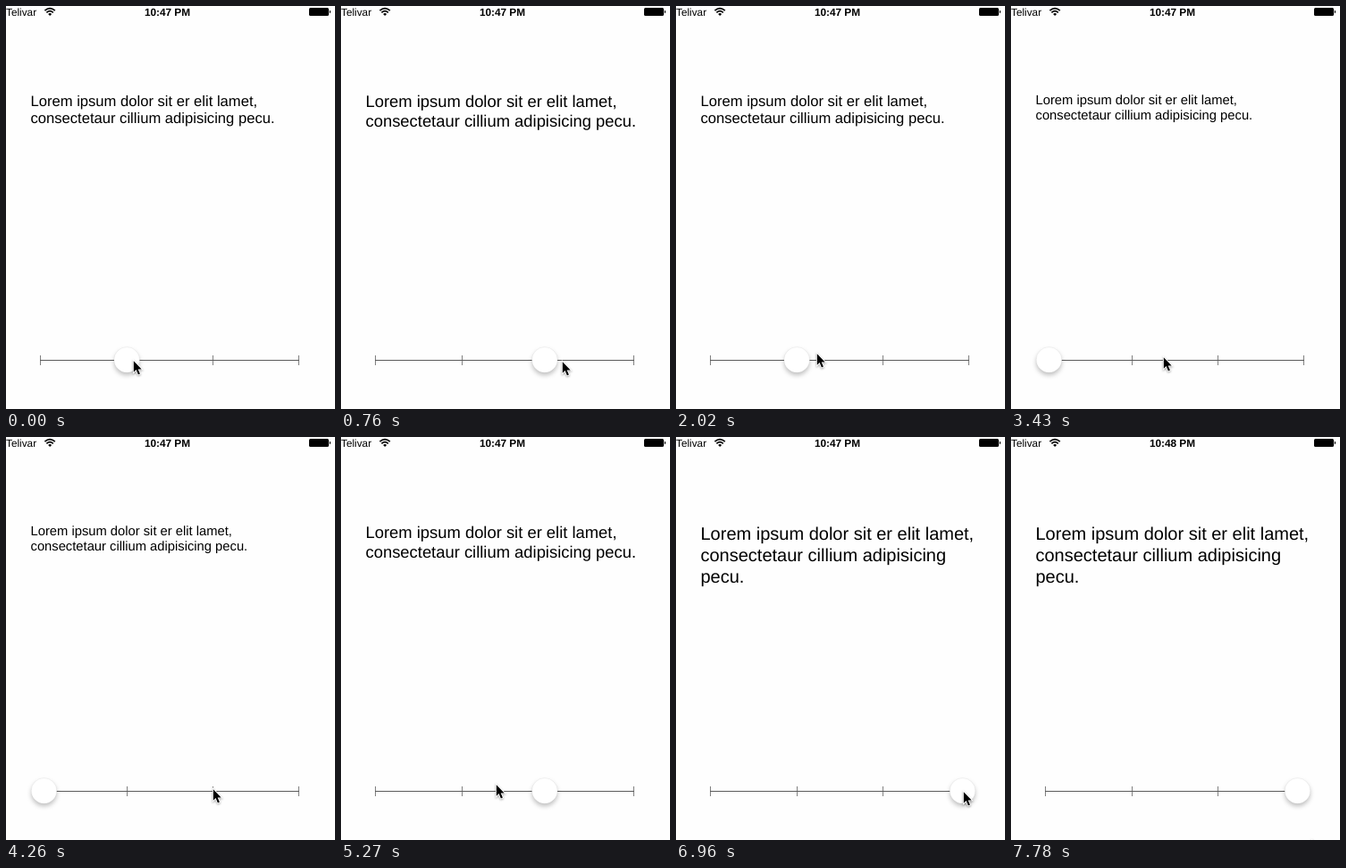
An HTML page for the animation above (8.27 s loop, 368x451 px).

```html
<!DOCTYPE html>
<html lang="en">
<head>
<meta charset="utf-8">
<title>Text size slider</title>
<style>
  html, body { margin: 0; width: 100%; height: 100%; overflow: hidden; background: #fefefe; }
  svg { display: block; width: 368px; height: 451px; }
  text { font-family: "Liberation Sans", Arial, sans-serif; text-rendering: geometricPrecision; }
  #thumb { filter: drop-shadow(0 3px 2.4px rgba(0, 0, 0, .24)); }
  #cursor { filter: drop-shadow(0 1px .8px rgba(0, 0, 0, .35)); }
</style>
</head>
<body>
<svg viewBox="0 0 368 451">
  <g font-size="11.8">
    <text x="0" y="10.6">Telivar</text>
    <text id="clock" x="180.5" y="10.6" text-anchor="middle" font-weight="bold">10:47 PM</text>
  </g>
  <g fill="none" stroke="#000" stroke-width="1.7">
    <path d="M43.4 5.2Q49 0 54.8 5.2M45.4 7.4Q49 4 52.8 7.4"/>
    <path d="M49.1 11L47.1 8.9Q49.1 7.3 51.1 8.9Z" fill="#000" stroke="none"/>
  </g>
  <rect x="339" y="2" width="22" height="9" rx="1.5"/>
  <path d="M361.8 4.5Q364.6 6.5 361.8 8.5Z"/>

  <g id="label"></g>

  <g fill="none">
    <path d="M38.5 391V402M135.5 391V402M231.5 391V402M327.5 391V402" stroke="#808080"/>
    <path d="M38 396.5H328" stroke="#5c5c5c"/>
  </g>
  <circle id="thumb" cy="396" r="14.3" fill="#fff" stroke="#000" stroke-opacity=".1" stroke-width=".5"/>
  <path id="cursor" d="M.8 1.2V13.8L3.6 11.1 5.9 16.4 7.9 15.5 5.7 10.4H9.7Z"
        stroke="#fff" stroke-width="1.8" paint-order="stroke"/>
</svg>
<script>
const LOOP = 8270;
const $ = id => document.getElementById(id);

const ease = {
  line: p => p,
  in: p => p * p,
  out: p => 1 - (1 - p) ** 2,
  both: p => p * p * (3 - 2 * p)
};

// Pointer moves: start, end, steps, target x, target y, easing
const start = [142, 396];
const moves = [
  [50, 340, 6, 235, 397, 'both'],
  [760, 940, 4, 313, 397, 'both'],
  [1480, 1480, 1, 305, 397, 'line'],
  [1540, 2020, 9, 157, 388, 'line'],
  [2080, 2250, 4, 128, 389, 'out'],
  [2310, 2780, 9, 62, 389, 'both'],
  [3260, 3430, 4, 170, 392, 'in'],
  [3490, 3730, 5, 243, 389, 'out'],
  [4080, 4260, 4, 231, 393, 'out'],
  [5030, 5440, 7, 135, 385, 'both'],
  [6100, 6210, 3, 252, 384, 'in'],
  [6270, 6670, 8, 321, 396, 'out'],
  [7500, 7780, 6, 336, 450, 'in']
];

function pointerAt(t) {
  let [x, y] = start;
  for (const [t0, t1, n, tx, ty, curve] of moves) {
    if (t < t0) break;
    const done = t >= t1 ? 1 : (Math.floor((t - t0) * (n - 1) / (t1 - t0)) + 1) / n;
    const p = ease[curve](done);
    x += (tx - x) * p;
    y += (ty - y) * p;
  }
  return [Math.round(x), Math.round(y)];
}

// Slider stops: the first part is a drag, then three taps
const stopX = i => 42.5 + i * 92.67;

function stopAt(t, x) {
  if (t >= 6960) return 3;
  if (t >= 5680) return 1;
  if (t >= 4610) return 2;
  if (t >= 2780) return 0;
  return Math.max(0, Math.min(3, Math.round((x - 7 - stopX(0)) / 92.67)));
}

// Per stop: font size, first baseline, line height
const styles = [[14.75, 110, 17], [16.6, 112, 19], [18.4, 113, 22], [20, 115, 24]];
const first = 'Lorem ipsum dolor sit er elit lamet,';
const second = 'consectetaur cillium adipisicing';

function setLabel(i) {
  const [size, top, leading] = styles[i];
  const lines = i < 3 ? [first, second + ' pecu.'] : [first, second, 'pecu.'];
  $('label').setAttribute('font-size', size);
  $('label').innerHTML = lines.map((line, k) =>
    `<text x="27.5" y="${top + leading * k}">${line}</text>`).join('');
}

let shown = -1;

function draw(t) {
  const [x, y] = pointerAt(t);
  const stop = stopAt(t, x);
  $('cursor').setAttribute('transform', `translate(${x} ${y})`);
  $('clock').textContent = t < 7640 ? '10:47 PM' : '10:48 PM';
  if (stop !== shown) {
    shown = stop;
    $('thumb').setAttribute('cx', stopX(stop));
    setLabel(stop);
  }
}

const begin = performance.now();
function tick() {
  draw((performance.now() - begin) % LOOP);
  requestAnimationFrame(tick);
}
tick();
</script>
</body>
</html>
```
